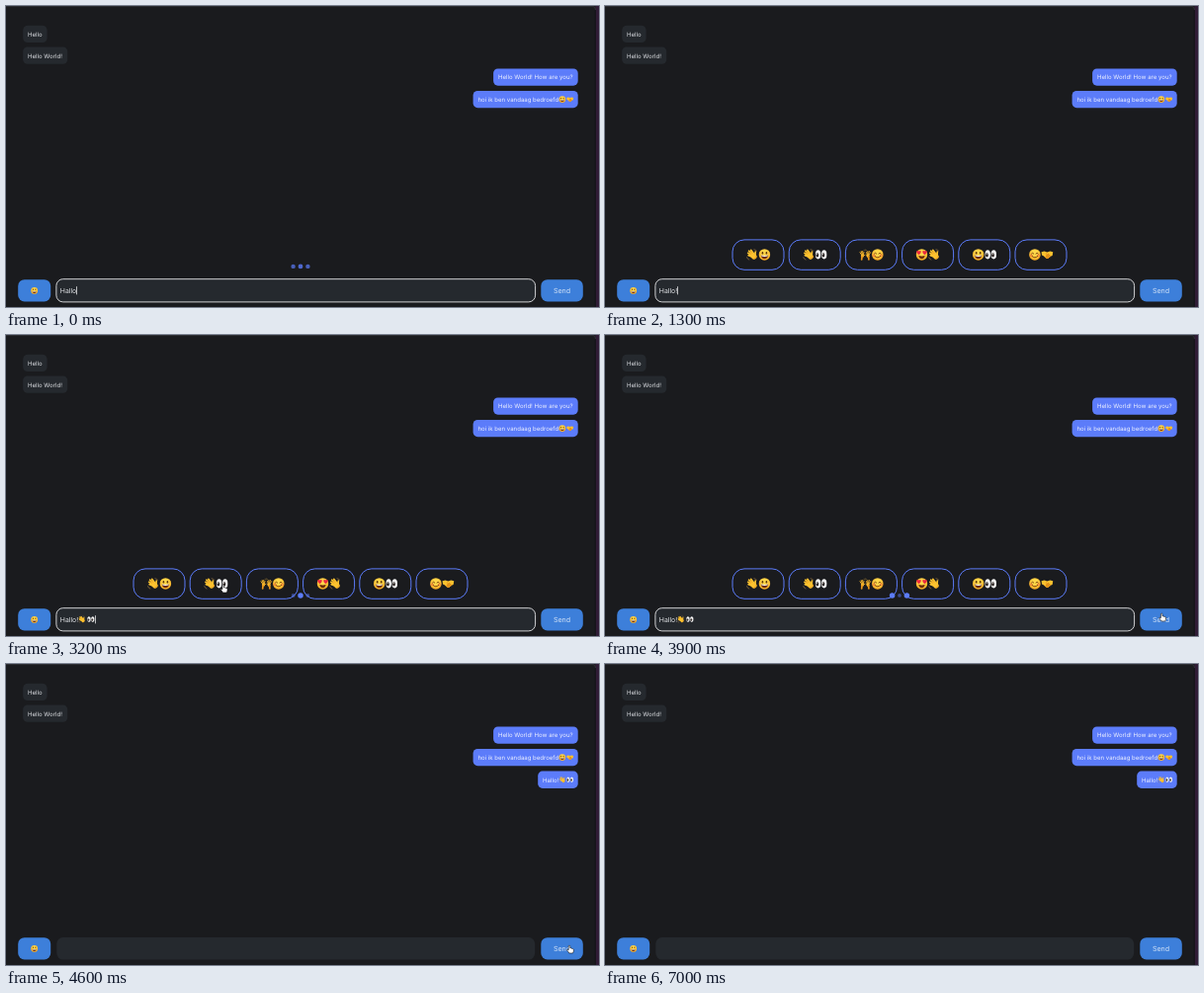
Write an HTML page that moves like this. It is 600 px wide and 305 px high and loops after 8100 ms.

```html
<!DOCTYPE html>
<html lang="en">
<head>
<meta charset="utf-8">
<title>Chat with emoji suggestions</title>
<style>
  html, body { margin: 0; width: 100%; height: 100%; overflow: hidden; background: #1a1b1e; }
  svg { display: block; }
  #stage { width: 600px; height: 305px; }
  text { font-family: Inter, "Open Sans", sans-serif; fill: #dfe1e5; text-rendering: geometricPrecision; }
  .msg { font-size: 6.05px; }
  .own { fill: #eef1ff; }
  .field { font-size: 6.9px; }
  .send { font-size: 7.1px; fill: #d3e3f8; }
</style>
</head>
<body>
<svg id="stage" viewBox="0 0 600 305">
  <defs>
    <radialGradient id="skin" cy=".35" r=".7">
      <stop offset=".3" stop-color="#ffd84a"/><stop offset="1" stop-color="#f5a11d"/>
    </radialGradient>
    <symbol id="grin" viewBox="0 0 20 20">
      <circle cx="10" cy="10" r="9.3" fill="url(#skin)"/>
      <ellipse cx="6.8" cy="7.2" rx="1.3" ry="2" fill="#5a3208"/>
      <ellipse cx="13.2" cy="7.2" rx="1.3" ry="2" fill="#5a3208"/>
      <path d="M4 10.8Q10 12.4 16 10.8Q15 17 10 17T4 10.8Z" fill="#6b2c0c"/>
      <path d="M4.6 11Q10 12.4 15.4 11L15 12.7Q10 13.8 5 12.7Z" fill="#fff"/>
    </symbol>
    <symbol id="blush" viewBox="0 0 20 20">
      <circle cx="10" cy="10" r="9.3" fill="url(#skin)"/>
      <circle cx="4.2" cy="11.3" r="2.5" fill="#f4743b" opacity=".6"/>
      <circle cx="15.8" cy="11.3" r="2.5" fill="#f4743b" opacity=".6"/>
      <path d="M4.5 8.5Q6.4 5.6 8.3 8.5M11.7 8.5Q13.6 5.6 15.5 8.5M5.5 12.6Q10 17.3 14.5 12.6" fill="none" stroke="#6b350b" stroke-width="1.4" stroke-linecap="round"/>
    </symbol>
    <symbol id="love" viewBox="0 0 20 20">
      <circle cx="10" cy="10" r="9.3" fill="url(#skin)"/>
      <path id="heart" d="M5.5 10.5C-1 6.5 1.6 1.6 5.3 4.4C8.4 1.6 11 6 5.5 10.5Z" fill="#ee2b3f"/>
      <use href="#heart" transform="matrix(-1 0 0 1 20 0)"/>
      <path d="M4.8 11.8Q10 13 15.2 11.8Q14 17 10 17T4.8 11.8Z" fill="#6b2c0c"/>
    </symbol>
    <symbol id="eyes" viewBox="0 0 20 20">
      <g id="eye">
        <ellipse cx="5.2" cy="10" rx="4.4" ry="7.4" fill="#f4f4f4"/>
        <ellipse cx="3.9" cy="10.8" rx="2.2" ry="3.3" fill="#2b2320"/>
        <circle cx="3.4" cy="9.4" r=".8" fill="#fff"/>
      </g>
      <use href="#eye" x="9.8"/>
    </symbol>
    <symbol id="wave" viewBox="0 0 20 20">
      <g fill="none" stroke="#fdc22f" stroke-linecap="round">
        <path d="M10 11L3.2 7.5M11 9.6L4.6 4M12.6 8.4L8 2.7M9.5 13.5L4 11.2M15 11L15.3 5.4" stroke-width="2.7"/>
        <path d="M11.5 11.8L13.2 13.4" stroke-width="8.5"/>
      </g>
      <path d="M8.2 9.3L5.8 7.5M10 8.1L7.3 5.2M12 16.8Q16.8 16.6 17 12" fill="none" stroke="#d98617" stroke-width=".8"/>
      <path d="M1.3 14.5Q2 17.3 5 18.4M13.2 1.6Q16 2 17.5 4" fill="none" stroke="#a8834b" stroke-width="1" stroke-linecap="round"/>
    </symbol>
    <symbol id="hands" viewBox="0 0 20 20">
      <g id="palm" fill="none" stroke="#fbb92c" stroke-linecap="round">
        <path d="M3.8 10L1.4 6.4M4.9 9L3.4 4.6M6 9L5.8 4.4M7 10L7.8 6.2M6.4 13L8.9 10.8" stroke-width="1.5"/>
        <path d="M5.4 11.3L5.2 12.4" stroke-width="4.6"/>
        <path d="M4.7 13L4.2 18" stroke-width="2.8" stroke="#e8961c"/>
      </g>
      <use href="#palm" transform="matrix(-1 0 0 1 20 0)"/>
      <path d="M10 1.2V3.4M7.9 2L8.6 3.8M12.1 2L11.4 3.8" stroke="#c4973e" stroke-width=".7"/>
    </symbol>
    <symbol id="shake" viewBox="0 0 20 20">
      <path d="M0.4 5.8L5.4 4.4L10 6L14.6 4.4L19.6 5.8L18.4 11.6L16.2 12.4L10.8 16.6Q9 17 4 12L1.4 11Z" fill="#fdc22f"/>
      <path d="M10 6L7 8.8Q8.6 11 11 8.6L16.2 12.4L11 16.6Q9 17 6.6 14.6Z" fill="#ee9c1d"/>
      <path d="M11 8.6L15.6 12.6M9.4 10.4L13.4 14.2M8 12.2L11 15.4" stroke="#b86c11" stroke-width=".8"/>
    </symbol>
  </defs>

  <rect width="600" height="305" fill="#1a1b1e"/>
  <path d="M596.5 0H600V305H596.5Z" fill="#301c36"/>
  <path d="M596.3 4V305" stroke="#111214" stroke-width=".8"/>
  <path d="M0 .4H594Q596.5 .8 596.5 4" fill="none" stroke="#303136" stroke-width=".9"/>

  <g id="chat"></g>
  <g id="sent"></g>
  <g id="picks"></g>
  <g id="dots" fill="#5c7cfa"></g>

  <rect x="12.2" y="277.2" width="33" height="22.3" rx="6.5" fill="#3d7fda"/>
  <use href="#grin" x="25" y="284.7" width="7.4" height="7.4"/>
  <rect x="51.3" y="277" width="483.9" height="22.6" rx="6.5" fill="#25292e"/>
  <rect id="ring" x="50.9" y="276.7" width="484.7" height="23.2" rx="6.8" fill="none" stroke="#e6e7e9" stroke-width=".9"/>
  <text id="typed" class="field" x="54.8" y="290.9"></text>
  <g id="added">
    <use href="#wave" x="72.9" y="284.2" width="7.8" height="7.8"/>
    <use href="#eyes" x="82" y="284.2" width="7.8" height="7.8"/>
  </g>
  <rect id="caret" y="284.2" width=".7" height="8.2" fill="#fff"/>
  <rect x="541.3" y="277.2" width="42.5" height="22.3" rx="6.5" fill="#3d7fda"/>
  <text class="send" x="562.5" y="290.9" text-anchor="middle">Send</text>

  <g id="mouse" stroke="#111" stroke-width=".6" stroke-linejoin="round" fill="#fff">
    <path id="hand" d="M-1.6 -3.4Q-.8 -4.4 0 -3.4V-1Q1 -1.5 1.5 -.7Q2.4 -1 2.8 -.2Q3.7 -.2 3.6 .8Q3.6 2.6 2.7 4H-1Q-2 2.4 -3.3 .8Q-3.3 -.3 -1.6 .7Z"/>
    <path id="arrow" d="M-2 -4V3L-.4 1.6L.7 4L1.8 3.5L.8 1.2H3Z"/>
  </g>
</svg>
<script>
const LOOP = 8100, STEP = 100;
const TYPE_AT = 500, PICKS_AT = 1000, PICK_AT = 2900, BLUR_AT = 4500, SEND_AT = 4600;
const $ = id => document.getElementById(id);

function add(parent, tag, attrs, text) {
  const el = document.createElementNS("http://www.w3.org/2000/svg", tag);
  for (const k in attrs) el.setAttribute(k, attrs[k]);
  if (text) el.textContent = text;
  parent.append(el);
  return el;
}
const emoji = (parent, name, x, y, size) =>
  add(parent, "use", { href: "#" + name, x, y, width: size, height: size });

function bubble(parent, x, y, width, text, own, icons = []) {
  add(parent, "rect", { x, y, width, height: 17.3, rx: 4.6, fill: own ? "#5c7cfa" : "#25292e" });
  add(parent, "text", { x: x + 4.9, y: y + 11, class: own ? "msg own" : "msg" }, text);
  icons.forEach((name, i) => emoji(parent, name, 559.2 + i * 7.8, y + 5, 7.3));
}
bubble($("chat"), 17.2, 19.8, 24.4, "Hello");
bubble($("chat"), 17.2, 41.5, 45, "Hello World!");
bubble($("chat"), 493.1, 63.4, 85.6, "Hello World! How are you?", true);
bubble($("chat"), 472.6, 85.9, 106.1, "hoi ik ben vandaag bedroefd", true, ["grin", "shake"]);
bubble($("sent"), 538.2, 108.6, 40.5, "Hallo!", true, ["wave", "eyes"]);

["wave grin", "wave eyes", "hands blush", "love wave", "grin eyes", "blush shake"].forEach((pair, i) => {
  const x = 129 + i * 57.2;
  add($("picks"), "rect", { x, y: 236.9, width: 52, height: 30.4, rx: 12, fill: "#1a1b1e", stroke: "#5c7cfa", "stroke-width": 1 });
  pair.split(" ").forEach((name, j) => emoji($("picks"), name, x + 13.7 + j * 12.5, 245.7, 12.4));
});

const dots = [290.6, 298, 305.4].map(cx => add($("dots"), "circle", { cx, cy: 263.9 }));

// time, x, y of the pointer
const path = [
  [1600, 330, 190], [2100, 285, 250], [2500, 273, 261], [2700, 240, 255], [2900, 220.5, 257],
  [3300, 220.5, 257], [3800, 563, 286], [3900, 564, 286], [4400, 570.8, 289], [6000, 570.8, 289]
];
function pointerAt(t) {
  const i = path.findIndex(p => p[0] > t);
  if (i < 1) return null;
  const [a, b] = [path[i - 1], path[i]];
  const u = (t - a[0]) / (b[0] - a[0]), e = u * u * (3 - 2 * u);
  return [a[1] + (b[1] - a[1]) * e, a[2] + (b[2] - a[2]) * e];
}
const overButton = (x, y) =>
  (x > 541 && y > 277) || (y > 236 && y < 268 && x > 129 && x < 467 && (x - 129) % 57.2 < 52);

const show = (id, on) => $(id).setAttribute("visibility", on ? "inherit" : "hidden");

function drawDots(t) {
  const phase = (t / 467 + (t < PICKS_AT ? 0.3 : 0.65)) % 1;
  const dip = 1 - Math.abs(1 - 2 * phase);
  dots.forEach((dot, i) => {
    const k = i === 1 ? 1 - dip : dip;
    dot.setAttribute("r", 2.75 - 0.9 * k);
    dot.setAttribute("fill-opacity", 1 - 0.5 * k);
  });
}

function render(t) {
  const picked = t >= PICK_AT, sent = t >= SEND_AT;
  show("dots", t < PICKS_AT || (picked && !sent));
  drawDots(t);
  show("picks", t >= PICKS_AT && !sent);
  show("sent", sent);
  show("ring", t < BLUR_AT);
  show("added", picked && !sent);
  $("typed").textContent = sent ? "" : t < TYPE_AT ? "Hallo" : "Hallo!";
  show("caret", t < BLUR_AT && t % 600 < 300);
  $("caret").setAttribute("x", picked ? 90.1 : t < TYPE_AT ? 71.3 : 73.2);

  const pos = pointerAt(t);
  show("mouse", pos);
  if (pos) {
    const hand = overButton(...pos);
    $("mouse").setAttribute("transform", `translate(${pos})`);
    show("hand", hand);
    show("arrow", !hand);
  }
}

const start = performance.now();
function tick() {
  const t = (performance.now() - start) % LOOP;
  render(Math.floor(t / STEP) * STEP);
  requestAnimationFrame(tick);
}
tick();
</script>
</body>
</html>
```
